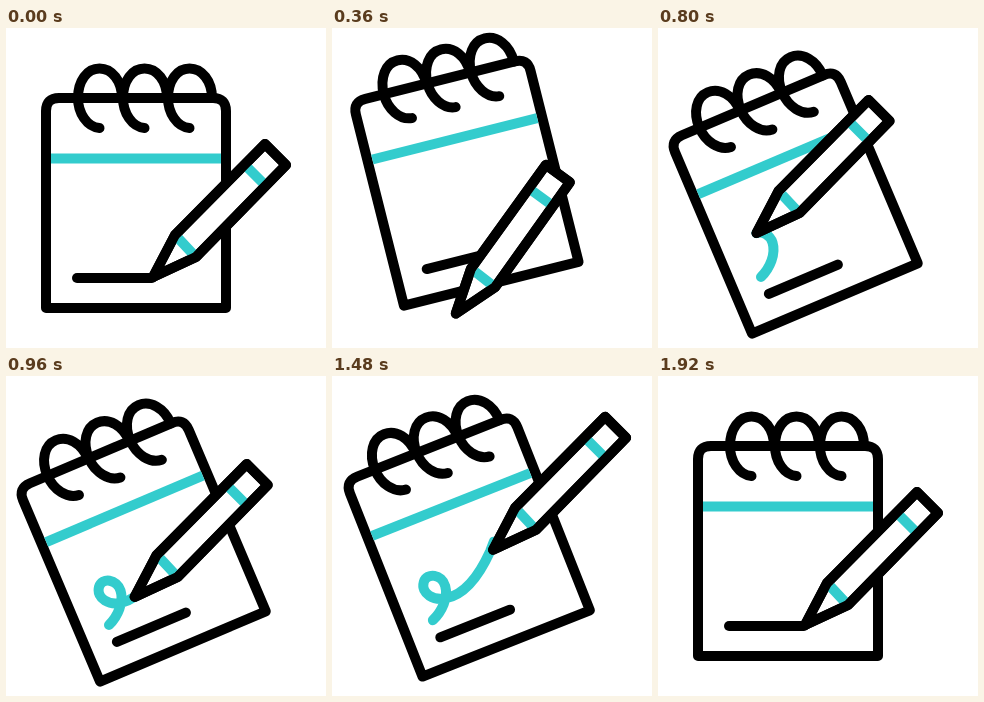
An HTML page for the animation above (2000 ms loop, 320x320 px).

```html
<!DOCTYPE html>
<html lang="en">
<head>
<meta charset="utf-8">
<title>Notepad and pencil</title>
<style>
  html, body { margin: 0; width: 100%; height: 100%; overflow: hidden; background: #fff; }
  svg { display: block; width: 100vw; height: 100vh; }
  path { fill: none; stroke: #000; stroke-width: 10; stroke-linecap: round; stroke-linejoin: round; }
  .paper { fill: #fff; }
  .teal { stroke: #33cccd; }
  .flat { stroke-linecap: butt; }
</style>
</head>
<body>
<svg viewBox="0 0 320 320">
  <defs>
    <path id="ring" d="M93.500 100C81 99 72 85 72 70C72 53 81 40.500 93.500 40.500S116 53 116 70"/>
  </defs>
  <g id="pad">
    <path class="paper" d="M40 280V83Q40 70 53 70H207Q220 70 220 83V280Z"/>
    <path class="teal flat" d="M45 130.500H215"/>
    <use href="#ring"/>
    <use href="#ring" x="45"/>
    <use href="#ring" x="90"/>
    <path d="M71 250H146"/>
    <g transform="rotate(23 130 160)">
      <path id="scribble" class="teal" d="M103 249C112 240 118 226 114.500 214.500C111 203 96 201 93 211C90 223 104 230 116 226.500C136 222 149.500 200 158.500 179L162 169"/>
    </g>
  </g>
  <g id="pencil">
    <path class="paper" d="M147 249L169 207L259 116L280 137L190 229Z"/>
    <path class="teal flat" d="M241.500 139.500L256.500 154.500M172.500 210.500L186.500 225.500"/>
    <path d="M147 249L169 207L259 116L280 137L190 229Z"/>
  </g>
</svg>
<script>
  const LOOP = 2000, STEP = 40, TILT = -23, HOP = 22;
  const pad = document.getElementById('pad');
  const pencil = document.getElementById('pencil');
  const scribble = document.getElementById('scribble');
  const total = scribble.getTotalLength();
  const rest = { x: 147, y: 249 };
  const first = scribble.getPointAtLength(0);
  const last = scribble.getPointAtLength(total);

  const span = (t, a, b) => Math.min(1, Math.max(0, (t - a) / (b - a)));
  const smooth = x => x * x * (3 - 2 * x);
  const soft = x => (x + smooth(x)) / 2;
  const arc = p => Math.sin(Math.PI * p);
  const mix = (a, b, p) => ({ x: a.x + (b.x - a.x) * p, y: a.y + (b.y - a.y) * p });

  function render(t) {
    const go = soft(span(t, 140, 512));
    const back = soft(span(t, 1434, 1920));
    const drawn = smooth(span(t, 512, 1260));
    const erased = smooth(span(t, 1480, 1800));

    const lean = go - back;
    pad.setAttribute('transform',
      `translate(0 ${-HOP * arc(lean)}) rotate(${TILT * lean} 130 160)`);

    const ink = total * (drawn - erased);
    scribble.style.visibility = ink > 0.5 ? 'visible' : 'hidden';
    scribble.style.strokeDasharray = `${ink} ${total + 20}`;

    let tip, turn = 0;
    if (go < 1) {
      // swing below the straight line on the way to the paper
      tip = mix(rest, first, go);
      tip.x += 4 * arc(go);
      tip.y += 39 * arc(go);
      turn = -9.5 * arc(go);
    } else if (back > 0) {
      tip = mix(last, rest, back);
    } else {
      tip = scribble.getPointAtLength(total * drawn);
    }
    pencil.setAttribute('transform',
      `translate(${tip.x - rest.x} ${tip.y - rest.y}) rotate(${turn} ${rest.x} ${rest.y})`);
  }

  const start = performance.now();
  function tick() {
    const t = (performance.now() - start) % LOOP;
    render(Math.floor(t / STEP) * STEP);
    requestAnimationFrame(tick);
  }
  tick();
</script>
</body>
</html>
```
